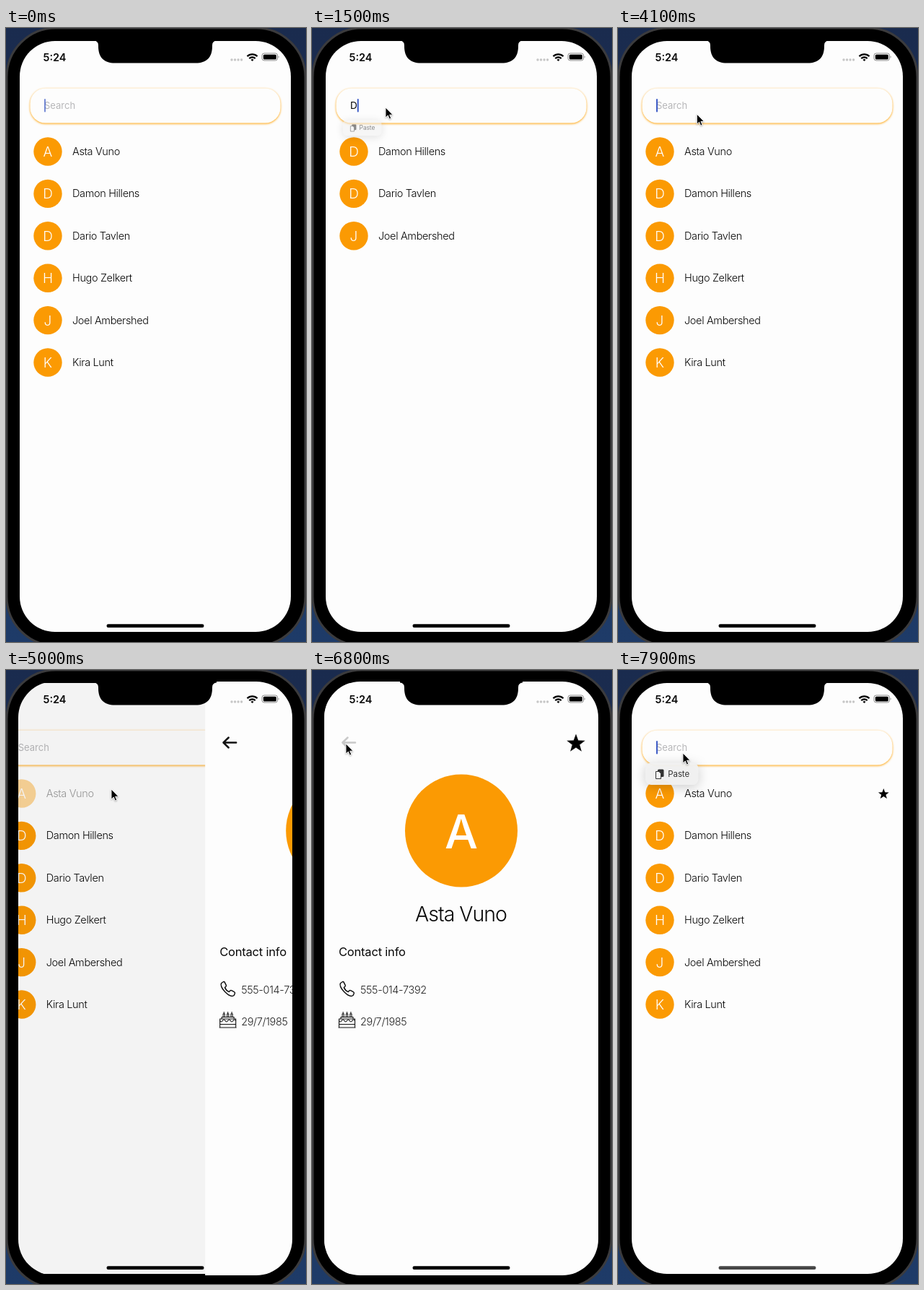
An HTML page that plays this animation: 416 px wide and 850 px high, repeating every 8 s.

```html
<!DOCTYPE html>
<html lang="en">
<head>
<meta charset="utf-8">
<title>Contacts</title>
<style>
  html, body { margin: 0; width: 100%; height: 100%; overflow: hidden; background: #1b3054; }
  svg { display: block; width: 100%; height: 100%; }
  text { font-family: Inter, Roboto, "Liberation Sans", sans-serif; fill: #080808; }
  .field { fill: #fdfdfd; filter: drop-shadow(0 1px 1.6px #ffa000); }
  .query { font-size: 13.5px; }
  .hint { font-size: 13px; fill: #b7b7b9; }
  .name { font-size: 14.5px; font-weight: 350; letter-spacing: -.35px; }
  .initial { font-size: 19px; font-weight: 350; fill: #fff; text-anchor: middle; }
  .big { font-size: 65px; font-weight: 450; fill: #fff; text-anchor: middle; }
  .title { font-size: 28.5px; font-weight: 300; letter-spacing: -1px; text-anchor: middle; }
  .head { font-size: 16.5px; letter-spacing: -.2px; }
  .info { font-size: 14.5px; font-weight: 350; letter-spacing: -.35px; fill: #222; }
  .line { fill: none; stroke: #111; stroke-linecap: round; stroke-linejoin: round; }
  .clock { font-size: 14.5px; font-weight: 600; }
  .paste { font-size: 11.5px; fill: #333; letter-spacing: -.1px; }
  .menu { fill: #f1f1f1; fill-opacity: .96; filter: drop-shadow(0 3px 8px rgba(0,0,0,.2)); }
  #mouse { filter: drop-shadow(0 1px 1px rgba(0,0,0,.3)); }
</style>
</head>
<body>
<svg viewBox="0 0 416 850">
  <defs>
    <linearGradient id="desk" x2="0" y2="1">
      <stop stop-color="#1a2b4e"/><stop offset="1" stop-color="#1e3b68"/>
    </linearGradient>
    <clipPath id="screen"><rect x="17" y="16" width="380" height="822" rx="50"/></clipPath>
    <path id="star" d=""/>
  </defs>

  <rect width="416" height="850" fill="url(#desk)"/>
  <rect x="1" y="0" width="414" height="855" rx="68" stroke="#3b3b3d" stroke-width="3"/>

  <g clip-path="url(#screen)">
    <g id="list">
      <rect x="19" y="18" width="376" height="818" rx="49" fill="#fdfdfd"/>
      <rect class="field" x="33.5" y="83.5" width="347" height="48" rx="21"/>
      <text id="hint" class="hint" x="53" y="112">Search</text>
      <text id="query" class="query" x="53" y="112"></text>
      <rect id="caret" x="53" y="98" width="2" height="18.5" rx="1" fill="#3e5cc6"/>
      <g id="rows"></g>
      <rect id="dim" x="19" y="18" width="490" height="818"/>
    </g>
    <g id="detail">
      <rect x="17" y="16" width="380" height="822" fill="#fdfdfd"/>
      <path id="back" class="line" stroke-width="2.5" d="M60 100.5H42.5M49.5 93.5l-7.2 7 7.2 7"/>
      <use id="fav" href="#star" transform="translate(366 101.8) scale(11.6)" stroke="#111" stroke-width=".11"/>
      <circle cx="207" cy="222.5" r="78" fill="#fb9a03"/>
      <text class="big" x="207" y="246.5">A</text>
      <text class="title" x="206.5" y="348">Asta Vuno</text>
      <text class="head" x="37" y="396">Contact info</text>
      <path class="line" stroke-width="1.5" d="M42.5 431.500l-3 2c-1.500 2 0 7 5 12s10 7 12.500 5l1.200-2.800c.3-1-.1-1.600-.9-2l-3.700-2c-.8-.4-1.500-.3-2.100.4l-1.200 1.500c-2.500-1-5-3.600-6-6l1.400-1.300c.6-.6.7-1.300.4-2l-2-4c-.4-.8-1-1.100-1.600-.8z"/>
      <text class="info" x="67" y="448">555-014-7392</text>
      <g class="line" stroke-width="1.1">
        <path d="M37 495h23M37.500 494v-11h22v11M37.500 490.500h22M40 483v-2.500h17v2.500"/>
        <path d="M37.500 485.500q1.830 3 3.660 0t3.660 0 3.660 0 3.660 0 3.660 0 3.660 0"/>
        <path d="M42 480v-4h2.200v4M47.400 480v-4h2.200v4M52.800 480v-4H55v4M43.100 475.500v-2M48.500 475.500v-2M53.900 475.500v-2"/>
      </g>
      <text class="info" x="67" y="491.500">29/7/1985</text>
    </g>
  </g>

  <path d="M122 15V17.500Q128 18 128 24V25C128 41 136 48.500 151 48.500H263C278 48.500 286 41 286 25V24Q286 18 292 17.500V15Z"/>
  <text class="clock" x="51.500" y="45.500">5:24</text>
  <path d="M313 44h13.600" stroke="#c6c6c6" stroke-width="3.400" stroke-linecap="round" stroke-dasharray="0 4.530"/>
  <g fill="none" stroke="#000" stroke-width="2.300">
    <path d="M334.500 39.200a10 10 0 0 1 14 0M337.300 42.200a6 6 0 0 1 8.400 0"/>
    <path d="M341.500 46l-2-2.100a3 3 0 0 1 4 0z" fill="#000" stroke="none"/>
  </g>
  <rect x="355" y="35" width="21.500" height="10" rx="3" fill="none" stroke="#8c8c8c"/>
  <rect x="356.800" y="36.700" width="18" height="6.700" rx="1.500"/>
  <path d="M377.700 38.500q2 1.500 0 3.200z" fill="#8c8c8c"/>
  <rect id="home" x="139.500" y="825.300" width="135" height="4.700" rx="2.350"/>

  <g id="popup">
    <rect class="menu" x="38" y="128.500" width="73.500" height="30.500" rx="8"/>
    <rect x="55" y="137.500" width="8.500" height="10.500" rx="1.500" fill="#333"/>
    <path d="M52.500 140.500h4.500l2.500 2.800v7.200h-7z" fill="#f1f1f1" stroke="#333"/>
    <text class="paste" x="69.300" y="148">Paste</text>
  </g>
  <path id="mouse" d="M0 0V14L3.300 11 5.400 16 7.700 15 5.600 10.200H10Z" stroke="#fff" stroke-width=".9"/>
</svg>

<script>
const LOOP = 8000, TICK = 100, WIDTH = 380;
const $ = id => document.getElementById(id);
const names = ["Asta Vuno", "Damon Hillens", "Dario Tavlen", "Hugo Zelkert", "Joel Ambershed", "Kira Lunt"];

// [time, value] keys; filter text trails the typing
const typed = [[0, ""], [1200, "D"], [1600, "Da"], [1900, "Dar"], [3200, "Da"], [3300, "D"], [3500, ""]];
const filter = [[0, ""], [1400, "D"], [1700, "Da"], [2100, "Dar"], [3900, ""]];
const caretFade = [[0, .7], [200, 0], [400, 0], [600, 1], [2500, 1], [2700, 0], [2800, 0], [3000, 1],
  [4700, 1], [4800, 0], [7600, 0], [7700, 1]];
const menuSize = [[1000, 0], [1200, 1], [1400, 1], [1500, .73], [1700, 0], [7600, 0], [7900, 1]];
const rowFade = [[4700, 1], [4800, .3], [4900, .3], [5000, .4], [5200, 1]];
const favFade = [[5800, 1], [5900, .25], [6000, .3], [6300, 1]];
const backFade = [[6700, 1], [6800, .22], [6900, .22], [7200, 1]];
const homeShade = [[7700, 0], [7900, 70]];
const mouseX = [[900, 108], [1000, 102], [4000, 102], [4600, 146], [5000, 146], [5300, 358], [5700, 367],
  [6100, 367], [6700, 47], [7400, 47], [7700, 90]];
const mouseY = [[900, 116], [1000, 110], [4000, 110], [4600, 165], [5000, 165], [5300, 144], [5700, 100],
  [6100, 100], [6700, 102], [7400, 102], [7700, 115]];

const held = (keys, t) => keys.filter(k => k[0] <= t).pop()[1];

function track(keys, t) {
  const i = keys.findIndex(k => k[0] > t);
  if (i === 0) return keys[0][1];
  if (i < 0) return keys[keys.length - 1][1];
  const [t0, a] = keys[i - 1], [t1, b] = keys[i];
  return a + (b - a) * (t - t0) / (t1 - t0);
}

// critically damped push and pop of the detail screen
function spring(ms) {
  if (ms <= 0) return 0;
  if (ms >= 600) return 1;
  const x = ms * .0182;
  return 1 - (1 + x) * Math.exp(-x);
}

$("star").setAttribute("d", "M" + Array.from({ length: 10 }, (_, i) => {
  const r = i % 2 ? .42 : 1, a = (i / 5 - .5) * Math.PI;
  return (r * Math.cos(a)).toFixed(3) + " " + (r * Math.sin(a)).toFixed(3);
}).join("L") + "Z");

$("rows").innerHTML = names.map((name, i) => `<g>
  <circle cx="58" cy="171" r="19.7" fill="#fb9a03"/>
  <text class="initial" x="58" y="178">${name[0]}</text>
  <text class="name" x="92" y="176">${name}</text>
  ${i ? "" : '<use id="mark" href="#star" transform="translate(368.3 171.800) scale(7.800)"/>'}
</g>`).join("");
const rows = [...$("rows").children];

const set = (id, attr, value) => $(id).setAttribute(attr, value);
const move = (id, x, y = 0) => set(id, "transform", `translate(${x} ${y})`);

function draw(t) {
  const query = held(typed, t), match = held(filter, t).toLowerCase();
  const liked = t >= 6000;

  $("query").textContent = query;
  set("hint", "opacity", query ? 0 : 1);
  set("caret", "x", 53 + (query ? $("query").getComputedTextLength() : 0));
  set("caret", "opacity", track(caretFade, t));

  let slot = 0;
  rows.forEach((row, i) => {
    const shown = names[i].toLowerCase().includes(match);
    row.setAttribute("display", shown ? "inline" : "none");
    if (shown) row.setAttribute("transform", `translate(0 ${58.4 * slot++})`);
  });
  rows[0].setAttribute("opacity", track(rowFade, t));
  set("mark", "opacity", liked ? 1 : 0);

  const p = spring(t - 4937) - spring(t - 6890);
  move("list", -.3 * WIDTH * p);
  move("detail", WIDTH * (1 - p));
  set("dim", "opacity", .12 * p);
  set("fav", "fill", liked ? "#000" : "none");
  set("fav", "opacity", track(favFade, t));
  set("back", "opacity", track(backFade, t));

  const size = track(menuSize, t);
  set("popup", "transform", `translate(55.7 123) scale(${size}) translate(-55.7 -123)`);
  set("popup", "opacity", Math.max(0, Math.min(1, size * 1.6 - .6)));

  const shade = track(homeShade, t);
  set("home", "fill", `rgb(${shade},${shade},${shade})`);
  move("mouse", track(mouseX, t), track(mouseY, t));
  set("mouse", "opacity", t < 900 ? 0 : 1);
}

const start = performance.now();
function frame() {
  const t = (performance.now() - start) % LOOP;
  draw(Math.floor(t / TICK) * TICK);
  requestAnimationFrame(frame);
}
frame();
</script>
</body>
</html>
```
